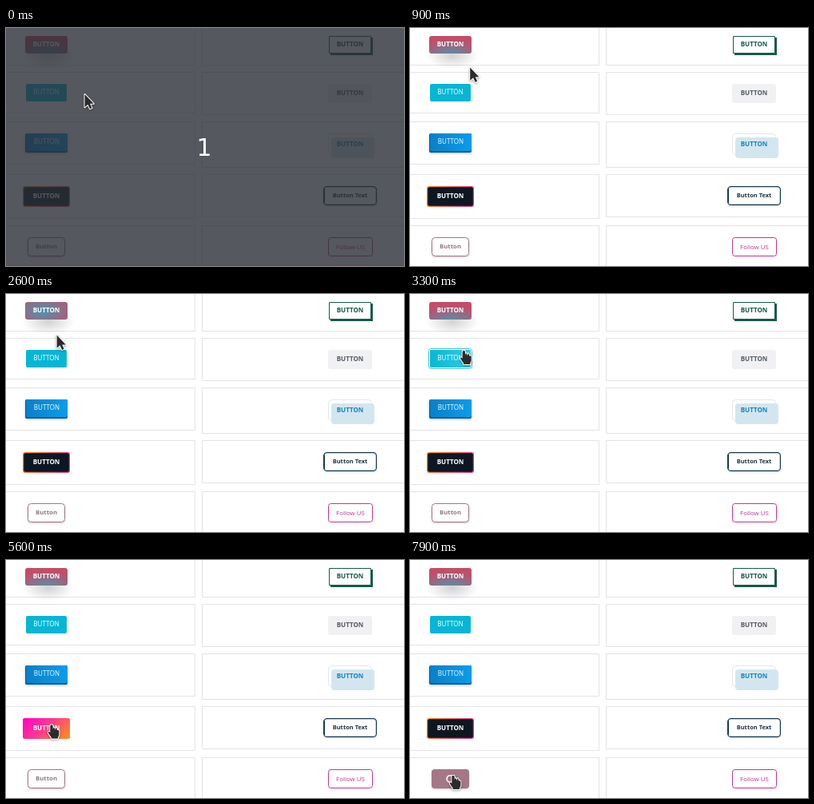
Write an HTML page with a canvas that moves like this. It is 498x298 px and loops after 8000 ms.

```html
<!DOCTYPE html>
<html lang="en">
<head>
<meta charset="utf-8">
<title>Button hover effects</title>
<style>
  html, body { margin: 0; width: 100%; height: 100%; overflow: hidden; background: #fff; }
  canvas { display: block; }
</style>
</head>
<body>
<canvas id="stage" width="498" height="298"></canvas>
<script>
const ctx = document.getElementById('stage').getContext('2d');
const LOOP = 8000, STEP = 100;

// Pointer moves: start, end, target x, target y
const START = [98.5, 83];
const MOVES = [
  [200, 300, 98.5, 84.5],
  [400, 1300, 58.5, 24.5],
  [2100, 3000, 67.3, 71],
  [4000, 4700, 56.5, 139],
  [5100, 5600, 57, 206.5],
  [6200, 6800, 52, 280.5],
  [7700, 7900, 54, 270],
];
// Left buttons: x, y, width, height
const BUTTONS = [
  [24, 10, 53, 22], [25, 70, 51, 22], [24, 132, 53, 24],
  [21, 198, 59, 26], [27, 262, 47, 24],
];

const clamp = v => Math.max(0, Math.min(1, v));
const ease = v => v * v * (3 - 2 * v);
const mix = (a, b, p) => a + (b - a) * p;
const ramp = (t, from, to) => ease(clamp((t - from) / (to - from)));
const hover = (t, inFrom, inTo, outFrom, outTo) =>
  ramp(t, inFrom, inTo) - ramp(t, outFrom, outTo);

function box(x, y, w, h, r, fill, stroke, line = 1) {
  ctx.beginPath();
  ctx.roundRect(x, y, w, h, r);
  if (fill) { ctx.fillStyle = fill; ctx.fill(); }
  if (stroke) { ctx.strokeStyle = stroke; ctx.lineWidth = line; ctx.stroke(); }
}

function label(text, x, y, color, weight = 700, size = 8) {
  ctx.font = `${weight} ${size}px "Noto Sans", sans-serif`;
  ctx.textAlign = 'center';
  ctx.fillStyle = color;
  ctx.fillText(text, x, y);
}

function gradient(x0, y0, x1, y1, ...colors) {
  const g = ctx.createLinearGradient(x0, y0, x1, y1);
  colors.forEach((c, i) => g.addColorStop(i / (colors.length - 1), c));
  return g;
}

function glow(x, y, rx, ry, inner, outer) {
  ctx.save();
  ctx.translate(x, y);
  ctx.scale(rx, ry);
  const g = ctx.createRadialGradient(0, 0, 0, 0, 0, 1);
  g.addColorStop(0, inner);
  g.addColorStop(1, outer);
  ctx.fillStyle = g;
  ctx.fillRect(-4, -4, 8, 8);
  ctx.restore();
}

function withShadow(color, blur, dy, draw) {
  ctx.save();
  ctx.shadowColor = color;
  ctx.shadowBlur = blur;
  ctx.shadowOffsetY = dy;
  draw();
  ctx.restore();
}

function withAlpha(alpha, draw) {
  if (alpha <= 0) return;
  ctx.save();
  ctx.globalAlpha = alpha;
  draw();
  ctx.restore();
}

function cells() {
  const border = '#e3e3e8';
  const rows = [[-10, 46, 46], [55, 106, 108], [117, 170, 174], [183, 238, 236], [247, 310, 310]];
  for (const [top, left, right] of rows) {
    box(-9.5, top + .5, 246, left - top, 0, null, border);
    box(245.5, top + .5, 270, right - top, 0, null, border);
  }
}

function radialButton(p) {
  glow(53, 35, 33, 16, 'rgba(70,70,80,.24)', 'rgba(70,70,80,0)');
  ctx.save();
  ctx.beginPath();
  ctx.roundRect(24, 10, 53, 22, 3);
  ctx.clip();
  glow(mix(51, 41, p), mix(36, 7, p), 42, 22, '#4798b2', '#c24e68');
  ctx.restore();
  label('BUTTON', 50.5, 23.3, '#fff');
}

function cyanButton(p) {
  box(25, 70, 51, 22, 2, '#06b6d4');
  withAlpha(p, () => {
    box(25, 70, 51, 22, 2, gradient(25, 0, 76, 0, '#08b8d6', '#2fcbe6'));
    box(23.5, 68.5, 54, 25, 3, null, '#3fc3da');
  });
  label('BUTTON', 50.5, 83.4, '#e9fbff', 500);
}

function blueButton(p) {
  withShadow('rgba(0,40,80,.3)', 3, 1, () => box(24, 132, 53, 24, 2, '#07609c'));
  box(25, 132, 52, 22, 2, gradient(24, 0, 77, 0, '#0880c6', '#0a9ceb'));
  withAlpha(p, () => box(25, 132, 52, 22, 2, gradient(24, 0, 77, 0, '#2391d4', '#27a3e6')));
  label('BUTTON', 51, 145.4, '#e8f5ff', 500);
}

function neonButton(p) {
  box(21, 198, 59, 26, 3, gradient(21, 198, 80, 224, '#ff8a1e', '#f25a58', '#d9388f'));
  box(22.2, 199.2, 56.6, 23.6, 2, '#0d1722');
  withAlpha(p, () =>
    box(21, 198, 59, 26, 3, gradient(30, 190, 71, 232, '#ff00c8', '#ff3f88', '#ff9512')));
  label('BUTTON', 50.5, 213.4, '#fff');
}

function mauveButton(p) {
  withShadow('rgba(70,40,60,.35)', 3, 1, () => box(27.5, 262.5, 46, 23, 4, '#fff'));
  box(27.5, 262.5, 46, 23, 4, '#fff', '#a27786');
  withAlpha(1 - p, () => label('Button', 50.5, 276.4, '#8f7888', 600, 7.8));
  withAlpha(p, () => {
    box(27, 262, 47, 24, 4, '#a57787');
    ctx.strokeStyle = '#fff';
    ctx.lineWidth = 1.7;
    ctx.beginPath();
    ctx.arc(50.3, 274, 4.2, .3, Math.PI * 1.75);
    ctx.stroke();
  });
}

function rightColumn() {
  box(406, 12, 53, 22, 0, '#17594a');
  box(404.5, 10.5, 52, 21, 0, '#fff', '#17594a');
  label('BUTTON', 430.5, 23.3, '#17594a');

  box(403, 70, 55, 24, 3, '#f1f1f3');
  label('BUTTON', 430.5, 84.4, '#565d66', 600);

  box(403.5, 132.5, 54, 26, 4, '#fff', '#e2e6ea');
  box(407, 137, 54, 26, 4, '#d3e6f0');
  label('BUTTON', 430.5, 148.4, '#1684c2');

  withShadow('rgba(20,40,60,.3)', 3, 1, () => box(397.5, 198.5, 66, 23, 4, '#fff'));
  box(397.8, 198.6, 65.6, 22.8, 4, '#fff', '#16394f', 1.2);
  box(397.2, 201, 1.8, 18, 1, '#16394f');
  label('Button Text', 430.5, 212.4, '#1d3545', 700, 7.5);

  box(403.5, 262.5, 55, 23, 3, '#fff', '#c2358c');
  label('Follow US', 431, 276.9, '#c2409a', 500, 7.9);
}

function pointerAt(t) {
  let [x, y] = START;
  for (const [from, to, tx, ty] of MOVES) {
    const p = ramp(t, from, to);
    x = mix(x, tx, p);
    y = mix(y, ty, p);
  }
  return [x, y];
}

const arrow = new Path2D('M0 0V16.2L3.9 12.7L6.5 18.3L9 17.2L6.6 11.8H11.2Z');
const hand = new Path2D(
  'M-1.7 1.2Q-1.5-.3 0-.3T1.7 1.2V5.6Q3-.1 4.4 6.2Q6-.1 7 6.8Q8.6 5.4 9.4 7.6' +
  'V12Q9.2 14 8 15.5V17H-.4V15.3Q-2.6 13-4.2 9.8Q-4.4 8-2.8 8.5L-1.7 9.8Z');

function pointer(t) {
  const [x, y] = pointerAt(t);
  const over = BUTTONS.some(([bx, by, w, h]) => x >= bx && x <= bx + w && y >= by && y <= by + h);
  const shape = over ? hand : arrow;
  ctx.save();
  ctx.translate(x, y);
  ctx.lineJoin = 'round';
  ctx.lineWidth = 2;
  ctx.strokeStyle = '#fff';
  withShadow('rgba(0,0,0,.4)', 3, 1, () => ctx.stroke(shape));
  ctx.fillStyle = '#2b2b2d';
  ctx.fill(shape);
  ctx.restore();
}

function countdown() {
  ctx.fillStyle = 'rgba(43,47,54,.8)';
  ctx.fillRect(0, 0, 498, 298);
  ctx.fillStyle = 'rgba(130,60,62,.5)';
  ctx.fillRect(0, 296.5, 498, 1.5);
  ctx.font = '30px "DejaVu Sans", sans-serif';
  ctx.textAlign = 'center';
  ctx.fillStyle = '#fff';
  ctx.fillText('1', 248, 160);
}

function render(t) {
  ctx.fillStyle = '#fff';
  ctx.fillRect(0, 0, 498, 298);
  cells();
  radialButton(hover(t, 1100, 1700, 2300, 2900));
  cyanButton(hover(t, 2900, 3300, 4300, 4900));
  blueButton(hover(t, 4450, 4750, 5250, 5500));
  neonButton(hover(t, 5400, 5600, 6400, 6600));
  mauveButton(hover(t, 6500, 6800, 8100, 8200));
  rightColumn();
  if (t < 100) countdown();
  pointer(t);
}

const begin = performance.now();
function tick() {
  const t = (performance.now() - begin) % LOOP;
  render(Math.floor(t / STEP) * STEP);
  requestAnimationFrame(tick);
}
tick();
</script>
</body>
</html>
```
